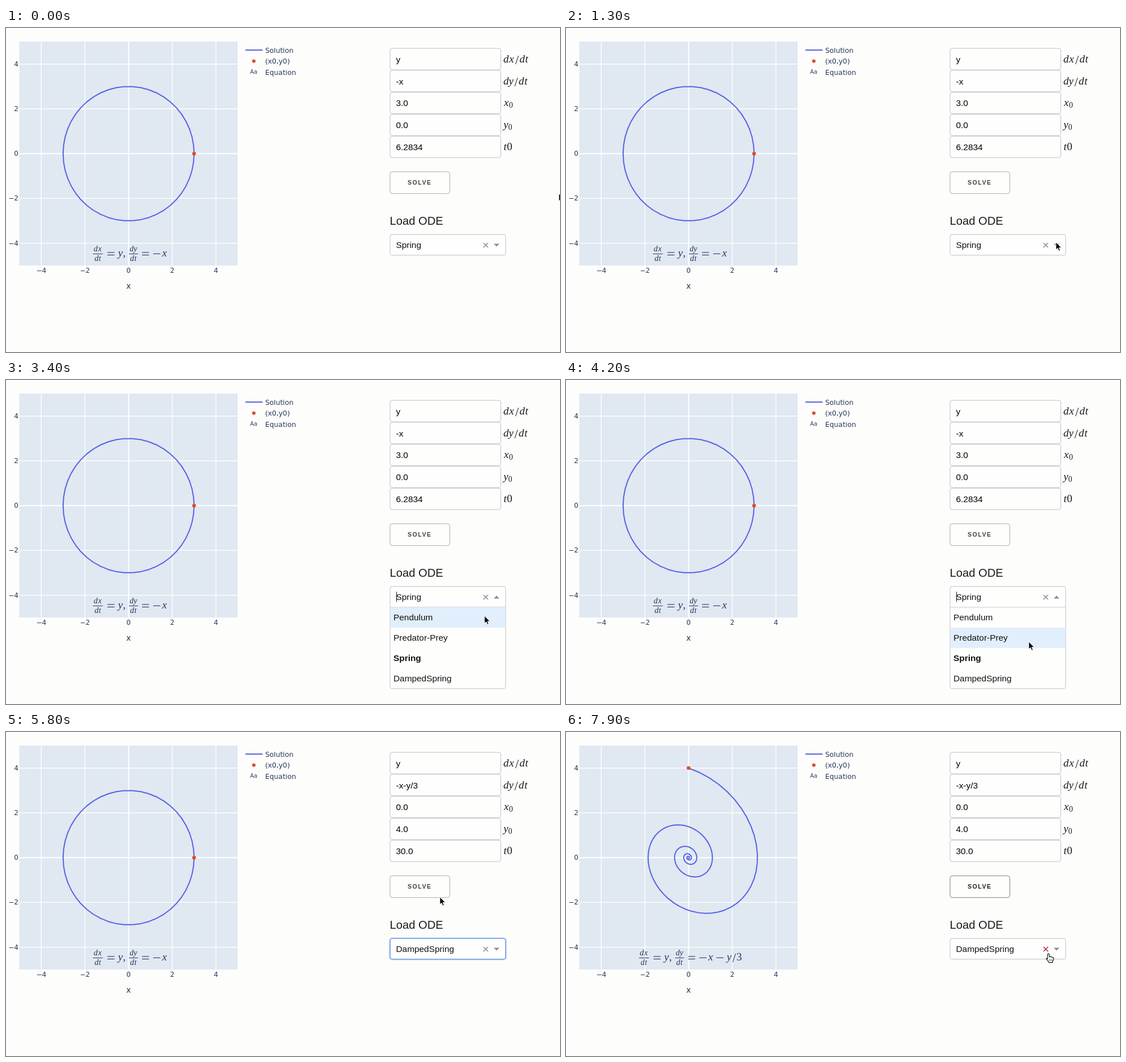
Recreate the animation shown at these times as an HTML page with a canvas. Size 978x573 px, loop 8000 ms.

```html
<!DOCTYPE html>
<html lang="en">
<head>
<meta charset="utf-8">
<title>ODE solver</title>
<style>
html, body { margin: 0; width: 100%; height: 100%; overflow: hidden; background: #fdfdfc; }
canvas { display: block; width: 978px; height: 573px; }
</style>
</head>
<body>
<canvas id="stage"></canvas>
<script>
const W = 978, H = 573, LOOP = 8000, STEP = 100;
const canvas = document.getElementById('stage');
const ratio = window.devicePixelRatio || 1;
canvas.width = W * ratio;
canvas.height = H * ratio;
const c = canvas.getContext('2d');

const SANS = '"Liberation Sans", Arial, sans-serif';
const SERIF = '"Liberation Serif", Times, serif';
const AXIS = '"DejaVu Sans", Verdana, sans-serif';
const NAVY = '#263a5a', BLUE = '#5662e6', RED = '#e6492f', EDGE = '#c0c0c9';
const ITEMS = ['Pendulum', 'Predator-Prey', 'Spring', 'DampedSpring'];
const LABELS = ['dx/dt', 'dy/dt', 'x_0', 'y_0', 't0'];
const SPRING = ['y', '-x', '3.0', '0.0', '6.2834'];
const DAMPED = ['y', '-x-y/3', '0.0', '4.0', '30.0'];

// Event times in ms
const OPEN = 2200, PICK = 5100, FILL = 5200, PRESS = 6500, SOLVED = 6700, DONE = 7400;

// Pointer tip: time, x, y
const PATH = [
  [0, 976, 293], [900, 965, 291], [1200, 865, 379], [2700, 866, 381],
  [3200, 848, 412], [4200, 817, 463], [4500, 806, 533], [5100, 802, 532],
  [5400, 800, 515], [5800, 766, 292], [6200, 760, 280], [7300, 760, 280], [7900, 851, 392]
];

function pointer(t) {
  let i = 0;
  while (i < PATH.length - 2 && t >= PATH[i + 1][0]) i++;
  const [t0, x0, y0] = PATH[i], [t1, x1, y1] = PATH[i + 1];
  const u = Math.min(1, (t - t0) / (t1 - t0)), k = u * u * (3 - 2 * u);
  return { x: x0 + (x1 - x0) * k, y: y0 + (y1 - y0) * k };
}

function text(s, x, y, font, color, align = 'left', spacing = 0) {
  c.font = font;
  c.fillStyle = color;
  c.textAlign = align;
  c.letterSpacing = spacing + 'px';
  c.fillText(s, x, y);
  c.letterSpacing = '0px';
}

function line(x0, y0, x1, y1, color, width) {
  c.strokeStyle = color;
  c.lineWidth = width;
  c.beginPath();
  c.moveTo(x0, y0);
  c.lineTo(x1, y1);
  c.stroke();
}

function dot(x, y, r) {
  c.fillStyle = RED;
  c.beginPath();
  c.arc(x, y, r, 0, 2 * Math.PI);
  c.fill();
}

function box(x, y, w, h, r, fill, stroke, width = 1) {
  c.beginPath();
  c.roundRect(x, y, w, h, r);
  c.fillStyle = fill;
  c.fill();
  c.strokeStyle = stroke;
  c.lineWidth = width;
  c.stroke();
}

function shape(points, fill, stroke, width) {
  c.beginPath();
  points.forEach(([x, y]) => c.lineTo(x, y));
  c.closePath();
  c.fillStyle = fill;
  c.fill();
  if (!stroke) return;
  c.strokeStyle = stroke;
  c.lineWidth = width;
  c.stroke();
}

// Math glyph advances in em
const ADVANCE = { d: .52, x: .572, y: .49, t: .361, '/': .5, ',': .278, 0: .5, 3: .5 };

function math(s, x, y, size, color) {
  let sub = false;
  for (const ch of s) {
    if (ch === '_') { sub = true; continue; }
    const px = sub ? size * .72 : size, w = ADVANCE[ch] * px;
    const style = /[a-z]/.test(ch) ? 'italic ' : '';
    const scale = ch === '/' ? 1.25 : 1.06;
    text(ch, x + w / 2, y + (sub || ch === '/' ? 3 : 0), style + px * scale + 'px ' + SERIF, color, 'center');
    x += w;
  }
}

function fraction(top, bottom, x, w) {
  const size = 13.4;
  const left = s => x + (w - [...s].reduce((a, ch) => a + ADVANCE[ch] * size, 0)) / 2;
  math(top, left(top), 395, size, NAVY);
  line(x, 399.5, x + w, 399.5, NAVY, 1);
  math(bottom, left(bottom), 411.5, size, NAVY);
}

function minus(x) { line(x, 399.3, x + 12.5, 399.3, NAVY, 1.1); }

function equals(x) {
  line(x, 397, x + 12.5, 397, NAVY, 1.1);
  line(x, 401.5, x + 12.5, 401.5, NAVY, 1.1);
}

function equation(x, damped) {
  fraction('dx', 'dt', x, 17.5);
  equals(x + 25.5);
  math('y,', x + 44, 404, 18, NAVY);
  fraction('dy', 'dt', x + 63.5, 16);
  equals(x + 86.5);
  minus(x + 106.5);
  math('x', x + 121, 404, 18, NAVY);
  if (damped) {
    minus(x + 136.5);
    math('y/3', x + 154.5, 404, 18, NAVY);
  }
}

const px = x => 216.4 + 38.54 * x;
const py = y => 222.2 - 39.6 * y;

function orbit(t) { return [3 * Math.cos(t), -3 * Math.sin(t)]; }

function spiral(t) {
  const b = 1 / 6, w = Math.sqrt(1 - b * b), e = 4 * Math.exp(-b * t);
  return [e / w * Math.sin(w * t), e * (Math.cos(w * t) - b / w * Math.sin(w * t))];
}

function curve(f, end, n) {
  c.strokeStyle = BLUE;
  c.lineWidth = 2;
  c.lineJoin = 'round';
  c.beginPath();
  for (let i = 0; i <= n; i++) {
    const [x, y] = f(end * i / n);
    c.lineTo(px(x), py(y));
  }
  c.stroke();
}

function plot(solved) {
  c.fillStyle = '#e0e8f1';
  c.fillRect(23.5, 24, 385.5, 396);
  for (let v = -4; v <= 4; v += 2) {
    const s = v < 0 ? '−' + -v : '' + v, w = v ? 1.4 : 2;
    line(px(v), 24, px(v), 420, '#fff', w);
    line(23.5, py(v), 409, py(v), '#fff', w);
    text(s, px(v), 433, '12px ' + AXIS, NAVY, 'center');
    text(s, 22, Math.round(py(v) + 4), '12px ' + AXIS, NAVY, 'right');
  }
  text('x', 216.4, 461, '14px ' + AXIS, NAVY, 'center');
  if (solved) curve(spiral, 30, 240);
  else curve(orbit, 6.2834, 50);
  const [x, y] = (solved ? spiral : orbit)(0);
  dot(px(x), py(y), 3.3);
  equation(solved ? 129 : 153.5, solved);

  line(422.5, 39, 453, 39, BLUE, 2);
  dot(437.5, 58.5, 3.1);
  text('Aa', 437.3, 81, '9.6px ' + AXIS, NAVY, 'center');
  ['Solution', '(x0,y0)', 'Equation'].forEach((s, i) =>
    text(s, 457.5, Math.round(43.6 + 19.5 * i), '12.3px ' + AXIS, NAVY));
}

function form(t) {
  const values = t >= FILL ? DAMPED : SPRING;
  values.forEach((s, i) => {
    const y = 36 + 38.8 * i, base = Math.round(y + 24.8);
    box(678, y, 195.5, 38, 4, '#fefefd', EDGE);
    text(s, 688.5, base, '15.4px ' + SANS, '#000');
    math(LABELS[i], 878, base, 18, '#1c1c1c');
  });
  const hot = t >= 5900;
  box(678, 254.3, 105.5, 38.5, 4, '#fefefd', hot ? '#808080' : '#acacac');
  text('SOLVE', 709, 277, 'bold 10.6px ' + SANS, hot ? '#222' : '#444', 'left', 1.5);
  text('Load ODE', 677.5, 348, '20.2px ' + SANS, '#1c1c1c');
}

function dropdown(t, p) {
  const open = t >= OPEN && t < PICK, focus = t >= PICK && t < PRESS;
  if (focus) box(677.5, 365, 205, 37.3, 4, '#fff', '#deebf9', 4);
  box(678, 365.2, 204, 36.6, open ? [4, 4, 0, 0] : 4, '#fefefd', focus ? '#4a85dc' : EDGE, focus ? 1.3 : 1);
  text(t >= PICK ? 'DampedSpring' : 'Spring', 688.5, 389, '15.4px ' + SANS, '#111');
  const clear = t >= 7800 ? '#b8162e' : '#85858f';
  line(843, 380, 851, 388, clear, 1.5);
  line(851, 380, 843, 388, clear, 1.5);
  const up = open ? -1 : 1;
  shape([[861, 384 - 2.4 * up], [871, 384 - 2.4 * up], [866, 384 + 2.6 * up]], '#8c8c92');
  if (!open) return;

  if ((t - OPEN) % 1000 < 500) line(689.5, 374.5, 689.5, 392.5, '#111', 1);
  box(678, 401.8, 204, 144, [0, 0, 4, 4], '#fefefd', EDGE);
  line(678.5, 401.8, 881.5, 401.8, '#e6e6e6', 1);
  const row = p.y > 402 ? Math.min(3, Math.floor((p.y - 402) / 36)) : 2;
  c.fillStyle = row === 2 ? '#daedf9' : '#e1eefb';
  c.fillRect(678.5, 402 + 36 * row, 203, 35.8);
  ITEMS.forEach((s, i) =>
    text(s, 684, Math.round(425.3 + 35.9 * i), (i === 2 ? 'bold ' : '') + '15.4px ' + SANS, '#111'));
}

function message() {
  box(-22, 536.3, 143.5, 24, 0, '#dfdfdf', '#999');
  text('Processing math: 100%', 112, 552.5, '12.3px ' + SANS, '#111', 'right');
}

function arrow(p) {
  const pts = [[0, 0], [0, 13], [3, 10.3], [5.2, 15.2], [7.3, 14.2], [5.2, 9.6], [9.3, 9.4]];
  shape(pts.map(([x, y]) => [p.x + x, p.y + y]), '#000', '#fff', .8);
}

function hand(p) {
  c.save();
  c.translate(p.x + .8, p.y + .4);
  c.beginPath();
  c.moveTo(-1.7, 9);
  c.lineTo(-1.7, 1);
  c.quadraticCurveTo(-.2, -1.4, 1.3, 1);
  c.lineTo(1.5, 5.4);
  c.quadraticCurveTo(3, 4, 4.2, 5.6);
  c.quadraticCurveTo(6, 4.6, 6.8, 6.4);
  c.quadraticCurveTo(9, 5.8, 9.1, 8);
  c.quadraticCurveTo(9.3, 11, 7.4, 13);
  c.lineTo(7.4, 15.2);
  c.lineTo(.6, 15.2);
  c.quadraticCurveTo(-.3, 12.7, -3.8, 9.2);
  c.quadraticCurveTo(-4, 6.6, -1.7, 9);
  c.closePath();
  c.fillStyle = '#fff';
  c.fill();
  c.strokeStyle = '#111';
  c.lineWidth = 1.2;
  c.stroke();
  [1.5, 4, 6.2].forEach(x => line(x, 9.2, x, 12.6, '#222', .8));
  c.restore();
}

function draw(t) {
  const p = pointer(t);
  c.setTransform(ratio, 0, 0, ratio, 0, 0);
  c.fillStyle = '#fdfdfc';
  c.fillRect(0, 0, W, H);
  plot(t >= SOLVED);
  form(t);
  dropdown(t, p);
  if (t >= SOLVED && t < DONE) message();
  const overArrow = t >= 1400 && p.y < 402 && t < 4000;
  const overButton = t >= 5900 && t < 7500;
  (overArrow || overButton || t >= 7800 ? hand : arrow)(p);
}

const start = performance.now();
function tick() {
  const t = Math.max(0, performance.now() - start) % LOOP;
  draw(Math.floor(t / STEP) * STEP);
  requestAnimationFrame(tick);
}
tick();
</script>
</body>
</html>
```
